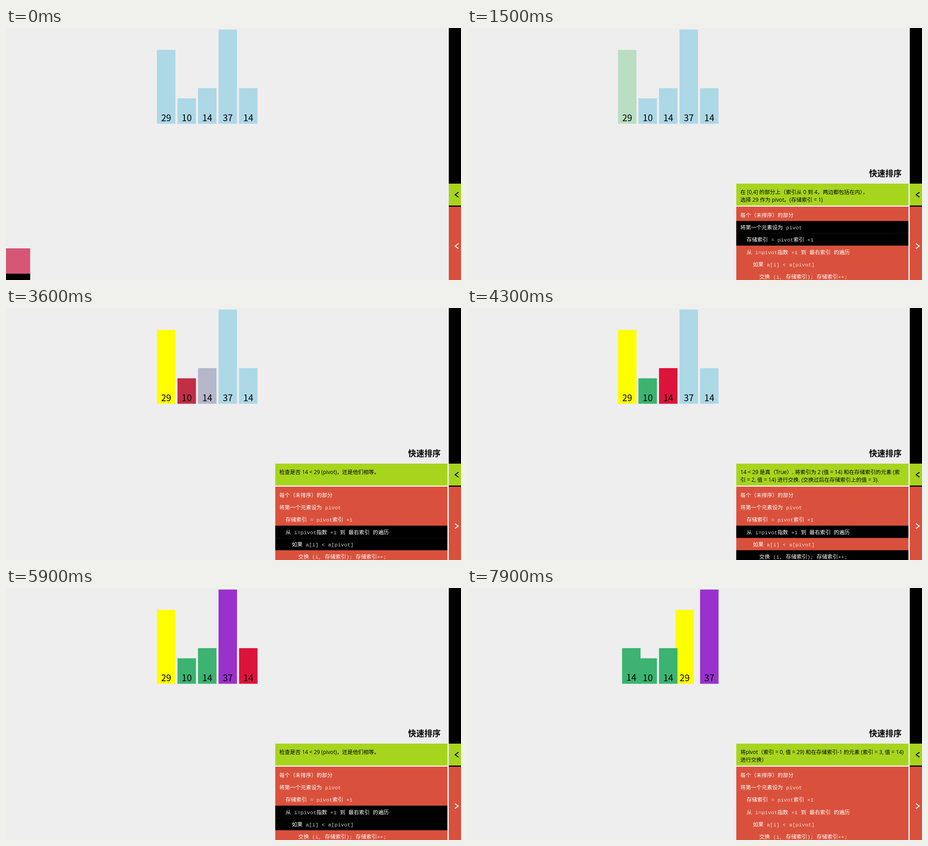
Write an HTML page with a canvas that moves like this. It is 1005 px wide and 557 px high and loops after 8000 ms.

```html
<!DOCTYPE html>
<html lang="zh-CN">
<head>
<meta charset="utf-8">
<title>快速排序</title>
<style>
  html, body { margin: 0; width: 100%; height: 100%; overflow: hidden; background: #eee; }
  canvas { display: block; }
</style>
</head>
<body>
<canvas id="stage" width="1005" height="557"></canvas>
<script>
const ctx = document.getElementById('stage').getContext('2d');
const LOOP = 8000, TICK = 100, OPEN_TIME = 500;
const LIME = '#a7d51e', RED = '#d9513c', PINK = '#d65775';
const CJK = "'Noto Sans CJK SC', 'Noto Sans CJK', sans-serif";

const blue = [173, 216, 230], yellow = [255, 255, 0], crimson = [220, 20, 60],
      green = [60, 179, 113], purple = [153, 50, 204];

const values = [29, 10, 14, 37, 14];

const codeLines = [
  [0, '每个（未排序）的部分'],
  [0, '将第一个元素设为 pivot'],
  [1, '存储索引 = pivot索引 +1'],
  [1, '从 i=pivot指数 +1 到 最右索引 的遍历'],
  [2, '如果 a[i] < a[pivot]'],
  [3, '交换 (i, 存储索引); 存储索引++;'],
];

const checkText = v => `检查是否 ${v} < 29 (pivot)，还是他们相等。`;
const swapText = (v, i, store, other) =>
  `${v} < 29 是真（True）. 将索引为 ${i} (值 = ${v}) 和在存储索引的元素 (索\n` +
  `引 = ${store}, 值 = ${other}) 进行交换. (交换过后在存储索引上的值 = ${store + 1}).`;

// Each step: start time, bar colours, bar slots, highlighted code lines, status text.
const start = [0, 1, 2, 3, 4], swapped = [0, 1, 2, 4, 3], sorted = [3, 1, 2, 4, 0];
const steps = [
  [0,    [blue, blue, blue, blue, blue], start, [], ''],
  [1500, [yellow, blue, blue, blue, blue], start, [1, 2],
    '在 [0,4] 的部分上（索引从 0 到 4，两边都包括在内），\n选择 29 作为 pivot。(存储索引 = 1)'],
  [2200, [yellow, crimson, blue, blue, blue], start, [3, 4], checkText(10)],
  [2900, [yellow, crimson, blue, blue, blue], start, [3, 5], swapText(10, 1, 1, 10)],
  [3600, [yellow, green, crimson, blue, blue], start, [3, 4], checkText(14)],
  [4300, [yellow, green, crimson, blue, blue], start, [3, 5], swapText(14, 2, 2, 14)],
  [5000, [yellow, green, green, crimson, blue], start, [3, 4], checkText(37)],
  [5700, [yellow, green, green, purple, crimson], start, [3, 4], checkText(14)],
  [6400, [yellow, green, green, purple, crimson], swapped, [3, 5], swapText(14, 4, 3, 37)],
  [7100, [yellow, green, green, purple, green], swapped, [3], '遍历完成。'],
  [7800, [yellow, green, green, purple, green], sorted, [],
    '将pivot（索引 = 0, 值 = 29) 和在存储索引-1 的元素 (索引 = 3, 值 = 14)\n进行交换）'],
].map(([at, colors, slots, rows, text]) => ({ at, colors, slots, rows, text }));

const clamp = x => Math.min(1, Math.max(0, x));
const mix = (a, b, p) => a + (b - a) * p;
const cubicInOut = x => x < .5 ? 4 * x ** 3 : 1 - 4 * (1 - x) ** 3;
const swing = x => .5 - Math.cos(Math.PI * x) / 2;

function box(x1, y1, x2, y2, fill) {
  ctx.fillStyle = fill;
  ctx.fillRect(x1, y1, x2 - x1, y2 - y1);
}

function label(text, x, y, font, fill = '#000', align = 'left') {
  ctx.font = font;
  ctx.fillStyle = fill;
  ctx.textAlign = align;
  ctx.fillText(text, x, y);
}

function chevron(y, color, angle) {
  ctx.save();
  ctx.translate(995.5, y);
  ctx.rotate(angle);
  ctx.strokeStyle = color;
  ctx.lineWidth = 2;
  ctx.beginPath();
  ctx.moveTo(4, -5.5);
  ctx.lineTo(-3.5, 0);
  ctx.lineTo(4, 5.5);
  ctx.stroke();
  ctx.restore();
}

function drawBars(from, to, p) {
  const bottom = 211.7;
  values.forEach((value, i) => {
    const x = 333.4 + 45.35 * mix(from.slots[i], to.slots[i], p);
    const rgb = from.colors[i].map((c, k) => Math.round(mix(c, to.colors[i][k], p)));
    box(x, bottom - 5.63 * value, x + 40.8, bottom, `rgb(${rgb})`);
    const lifted = i === 4 && to.slots[4] !== 4 ? .8 : 0;
    label(value, x + 20.4, 205.6 - lifted, `20px ${CJK}`, '#000', 'center');
  });
}

// Latin parts are fainter than the Chinese ones.
function codeText(text, x, y) {
  for (const part of text.match(/[ -~]+|[^ -~]+/g)) {
    const fill = /[ -~]/.test(part) ? 'rgba(255,255,255,.8)' : '#fff';
    label(part, x, y, "11.75px 'Liberation Mono', 'Noto Sans CJK SC', monospace", fill);
    x += ctx.measureText(part).width;
  }
}

function drawPanels(step, open) {
  const left = mix(975, 594.5, open);
  if (open > 0) label('快速排序', 960, 328.2, `bold 18px ${CJK}`, '#000', 'right');
  ctx.save();
  ctx.beginPath();
  ctx.rect(left, 340, 975 - left, 217);
  ctx.clip();
  box(left, 344, 975, 392.4, LIME);
  step.text.split('\n').forEach((line, i) =>
    label(line, left + 9.2, 367 + 17.4 * i, `11.75px 'Open Sans', ${CJK}`));
  box(left, 395, 975, 557, RED);
  codeLines.forEach(([indent, text], i) => {
    const top = 399.4 + 27.2 * i;
    if (step.rows.includes(i)) box(left, top, 975, top + 27.2, '#000');
    codeText(text, left + 9.2 + 13.9 * indent, top + 18.5);
  });
  ctx.restore();
}

function drawEdges(open) {
  box(978, 0, 1005, 557, '#000');
  box(978, 344, 1005, 392.4, LIME);
  box(978, 395, 1005, 557, RED);
  chevron(368.5, '#000', 0);
  chevron(482, '#fff', Math.PI * open);
  const menu = mix(53.4, 0, open);
  box(0, 487, menu, 543, PINK);
  box(0, 543, menu, 557, '#000');
}

function draw() {
  const time = Math.floor(performance.now() % LOOP / TICK) * TICK;
  const index = steps.findLastIndex(s => s.at <= time);
  const step = steps[index];
  const open = swing(clamp(time / OPEN_TIME));
  const progress = cubicInOut(clamp((time - step.at + 86) / 250));

  box(0, 0, 1005, 557, '#eee');
  drawBars(steps[Math.max(0, index - 1)], step, progress);
  drawPanels(step, open);
  drawEdges(open);
  requestAnimationFrame(draw);
}
requestAnimationFrame(draw);
</script>
</body>
</html>
```
